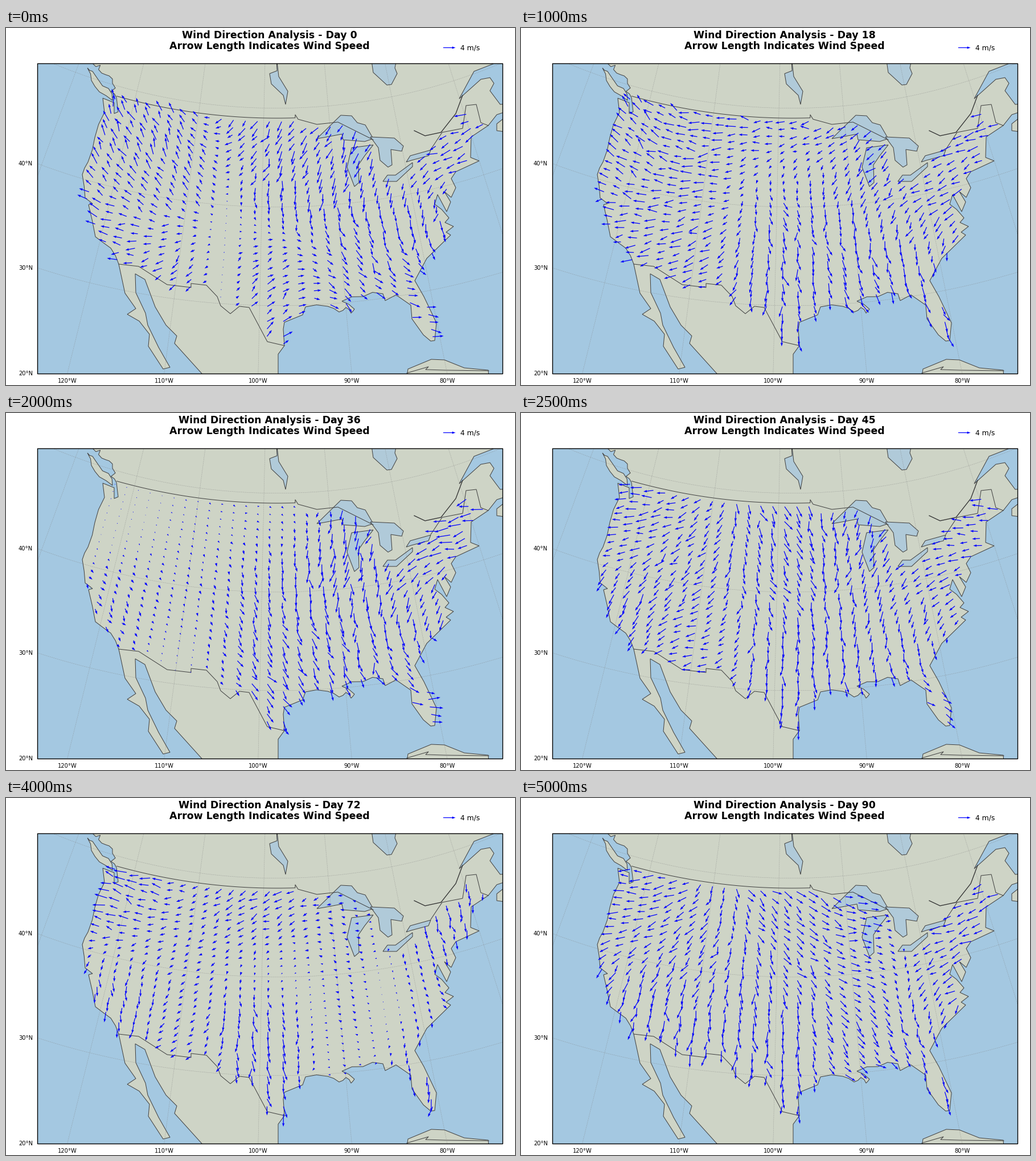
A matplotlib script for the animation above (5.5 s loop, 894 by 626 pixels).

```python
import numpy as np
import matplotlib.pyplot as plt
from matplotlib.animation import FuncAnimation
from matplotlib.patches import Polygon, Rectangle
from matplotlib.path import Path

W, H = 894, 626
LEFT, TOP, RIGHT, BOTTOM = 55, 62, 872, 606
LAND, OCEAN, LAKE, EDGE = "#ced4c6", "#a4c8e1", "#b0cad9", "#404040"
PX = 0.72  # points per pixel at 100 dpi


def pts(*flat):
    return np.array(flat, float).reshape(-1, 2)


def jag(shape, rough, seed):
    """Split every segment and push its middle sideways, for a ragged shore."""
    rng = np.random.default_rng(seed)
    step = np.diff(shape, axis=0)
    side = step[:, ::-1] * (-1, 1)
    mid = shape[:-1] + step / 2 + side * rng.uniform(-rough, rough, (len(step), 1))
    return np.vstack([np.stack([shape[:-1], mid], 1).reshape(-1, 2), shape[-1:]])


def project(lon, lat):
    """Lambert conformal cone (33N, 45N, centred on 98W) in stage pixels."""
    n = 0.6305
    rho = 1938.7 / np.tan(np.pi / 4 + np.radians(lat) / 2) ** n
    a = n * np.radians(np.asarray(lon) + 98)
    return 475.7 + rho * np.sin(a), -884.5 + rho * np.cos(a)


# ---- coasts ---------------------------------------------------------------
inlets = jag(jag(pts(152, 62, 168, 79, 187, 97, 194, 122), 0.4, 3), 0.5, 5)
sound = pts(197, 147, 190, 150, 190, 131)
pacific = jag(pts(170, 123, 173, 148, 156, 192, 144, 235, 134, 257, 139, 298, 152, 308,
                  145, 310, 157, 366, 184, 386, 198, 414), 0.05, 1)
baja = pts(209, 465, 228, 492, 213, 502, 234, 514, 252, 537, 250, 558, 276, 598, 288, 595,
           268, 560, 249, 521, 245, 500, 228, 464, 227, 431, 244, 441, 262, 489, 281, 521,
           300, 540, 296, 553, 344, 606, 344, 640, 478, 640, 478, 572, 489, 557)
texas = pts(487, 528, 489, 516, 521, 503)
delta = jag(pts(526, 489, 565, 488, 585, 498, 597, 490, 606, 500, 612, 493, 590, 479,
                627, 471, 662, 466), 0.16, 2)
florida = pts(666, 478, 685, 468, 711, 486, 713, 510, 733, 538, 746, 549, 753, 548,
              756, 517, 734, 471)
atlantic = pts(718, 443, 739, 404, 781, 363, 773, 358, 786, 348, 771, 341, 778, 333,
               765, 318, 753, 309, 758, 292, 774, 322, 781, 305, 770, 287, 782, 297,
               790, 280, 782, 264, 790, 252, 831, 233, 816, 227, 817, 191, 847, 171)
estuary = pts(862, 152, 880, 146, 880, 133, 868, 134, 850, 110, 857, 97, 850, 87, 834, 90,
              796, 124, 822, 76, 858, 62, 900, 40, 150, 40)
island = jag(pts(143, 70, 152, 76, 163, 92, 180, 106, 187, 127, 164, 112, 150, 92, 143, 70),
             0.15, 4)
scotia = pts(890, 146, 862, 168, 862, 180, 890, 184)
cuba = pts(704, 612, 706, 598, 747, 581, 770, 582, 805, 596, 847, 600, 848, 612)
cuba_south = pts(704, 605, 742, 594, 737, 599, 770, 600, 848, 601)

# ---- inland water ---------------------------------------------------------
bay = pts(641, 50, 645, 78, 669, 100, 677, 99, 687, 80, 683, 70, 687, 50)
winnipeg = pts(475, 50, 479, 85, 495, 111, 491, 134, 487, 118, 466, 98, 463, 80, 476, 75)
superior = pts(546, 194, 588, 153, 607, 154, 617, 166, 631, 170, 645, 194, 630, 199,
               592, 196, 590, 186, 558, 192)
michigan = pts(612, 278, 599, 244, 607, 210, 645, 205, 630, 224, 619, 240, 620, 271)
huron = pts(640, 191, 682, 193, 698, 207, 695, 216, 676, 213, 678, 240, 671, 244, 657, 232,
            654, 210)
erie = pts(662, 269, 670, 258, 684, 258, 714, 236, 714, 243, 686, 269)
ontario = pts(703, 235, 710, 224, 746, 214, 742, 224, 712, 232)

# ---- borders --------------------------------------------------------------
parallel = np.column_stack(project(np.linspace(-122.8, -95.2, 40), 49.0))
north = np.vstack([parallel, pts(508, 152, 513, 160, 546, 169, 583, 165, 645, 196)])
maine = pts(746, 213, 766, 183, 802, 176, 808, 136, 826, 134, 834, 166, 847, 171)
river = pts(717, 180, 736, 189, 764, 183, 790, 150, 802, 118)
mexico = pts(198, 414, 233, 418, 283, 450, 325, 455, 325, 448, 352, 451, 371, 471, 377, 487,
             394, 501, 410, 488, 427, 490, 459, 550, 489, 557)

south_east = np.vstack([texas, delta, florida, atlantic])
mainland = np.vstack([inlets, sound, pacific, baja, south_east, estuary])
lakes_edge = pts(672, 262, 690, 271, 715, 246)
country = np.vstack([north, lakes_edge, maine, south_east[::-1], mexico[::-1],
                     pacific[::-1]])

# ---- wind -----------------------------------------------------------------
COMPASS = "N NNE NE ENE E ESE SE SSE S SSW SW WSW W WNW NW NNW".split()
# north-west, south-west, mountains, desert, north plains, plains, south plains,
# midwest, south, north-east, mid Atlantic, peninsula
STATIONS = pts(190, 190, 200, 350, 310, 260, 300, 420, 460, 190, 480, 300, 450, 410,
               580, 270, 620, 410, 770, 210, 740, 340, 740, 480)
HEADINGS = {
    0: "NNW WNW NNW SW SW S NE SSW SE WSW S E",
    18: "NW W W WSW W SE S SW SSE WSW SW SSE",
    27: "E E ENE E N SW ESE S SE WSW S E",
    45: "W SSW SW W SSE SE S SSW S W SW ESE",
    63: "NW SE NW NW SSW SSE S N NNE SW ENE SSW",
    81: "W SSW S SSW W NNW SSE SW WSW SE SSW SSE",
    90: "W SSW SW S SE SSE S E SE WSW SW SSE",
}
SPEED, REACH = 18, 62

lon, lat = np.meshgrid(-124.767 + 44 / 24 * np.arange(32), 49.4 - 0.75 * np.arange(33))
tails = np.column_stack([c.ravel() for c in project(lon, lat)])
tails = tails[Path(country).contains_points(tails)]

gap = ((tails[:, None] - STATIONS) ** 2).sum(2)
weight = np.exp(-gap / (2 * REACH ** 2))
weight /= weight.sum(1, keepdims=True)


def station_wind(day):
    """Complex dx + i dy at the stations; unlisted days blend their neighbours."""
    if day in HEADINGS:
        turn = [COMPASS.index(name) * np.pi / 8 for name in HEADINGS[day].split()]
        return -1j * np.exp(1j * np.array(turn))
    return 0.6 * (station_wind(day - 9) + station_wind(day + 9))


def wind(i):
    rng = np.random.default_rng(i)
    z = SPEED * weight @ station_wind(9 * i)
    z = z * rng.uniform(0.75, 1.25, len(z)) * np.exp(1j * rng.normal(0, 0.2, len(z)))
    return z.real, z.imag


# ---- stage ----------------------------------------------------------------
fig = plt.figure(figsize=(W / 100, H / 100), dpi=100, facecolor="white")
ax = fig.add_axes([0, 0, 1, 1])
ax.set(xlim=(0, W), ylim=(H, 0))
ax.axis("off")
box = (LEFT, TOP), RIGHT - LEFT, BOTTOM - TOP
frame = Rectangle(*box, fc="none", ec="black", lw=1.4 * PX, zorder=6)
ax.add_patch(Rectangle(*box, fc=OCEAN, ec="none", zorder=0))
ax.add_patch(frame)


def area(shape, color, z):
    p = Polygon(shape, fc=color, ec=EDGE, lw=1.0 * PX, zorder=z)
    ax.add_patch(p)
    p.set_clip_path(frame)


def line(x, y, **style):
    ax.plot(x, y, **style)[0].set_clip_path(frame)


for shape in (mainland, island, scotia, cuba):
    area(shape, LAND, 1)
area(bay, LAKE, 2)
for shape in (winnipeg, superior, michigan, huron, erie, ontario):
    area(shape, LAKE, 2)
for shape in (north, maine, mexico, cuba_south):
    line(*shape.T, color=EDGE, lw=1.0 * PX, zorder=3)
line(*river.T, color="#303030", lw=1.3 * PX, zorder=3)

grid = dict(color="gray", lw=0.62 * PX, ls="--", alpha=0.5, zorder=4)
for m in range(-140, -49, 10):
    line(*project(np.full(50, m), np.linspace(15, 60, 50)), **grid)
for p in (20, 30, 40, 50):
    line(*project(np.linspace(-140, -50, 120), np.full(120, p)), **grid)

font = dict(family="DejaVu Sans", color="black")
for p in (20, 30, 40):
    x, y = project(np.linspace(-140, -98, 400), np.full(400, p))
    y = min(np.interp(LEFT, x, y), BOTTOM)
    ax.text(47, y, f"{p}°N", ha="right", va="center", size=9.9 * PX, **font)
for m in range(80, 121, 10):
    x, y = project(np.full(400, -m), np.linspace(30, 10, 400))
    ax.text(np.interp(BOTTOM, y, x), 618.5, f"{m}°W", ha="center", va="center",
            size=9.9 * PX, **font)

bold = dict(ha="center", va="baseline", weight="bold", size=17.34 * PX, **font)
title = ax.text(463, 17.5, "", **bold)
ax.text(463, 37, "Arrow Length Indicates Wind Speed", **bold)
ax.text(798, 34.5, "4 m/s", ha="left", va="center", size=12.4 * PX, **font)

arrow = dict(angles="xy", scale_units="xy", scale=1, units="xy", width=1.25, headwidth=3.4,
             color="blue", zorder=5)
ax.quiver([768], [34.5], [21.5], [0], **arrow)
field = ax.quiver(*tails.T, *wind(0), **arrow)


def update(i):
    title.set_text(f"Wind Direction Analysis - Day {9 * i}")
    field.set_UVC(*wind(i))
    return title, field


anim = FuncAnimation(fig, update, frames=11, interval=500, repeat=True, repeat_delay=0)
plt.show()
```
